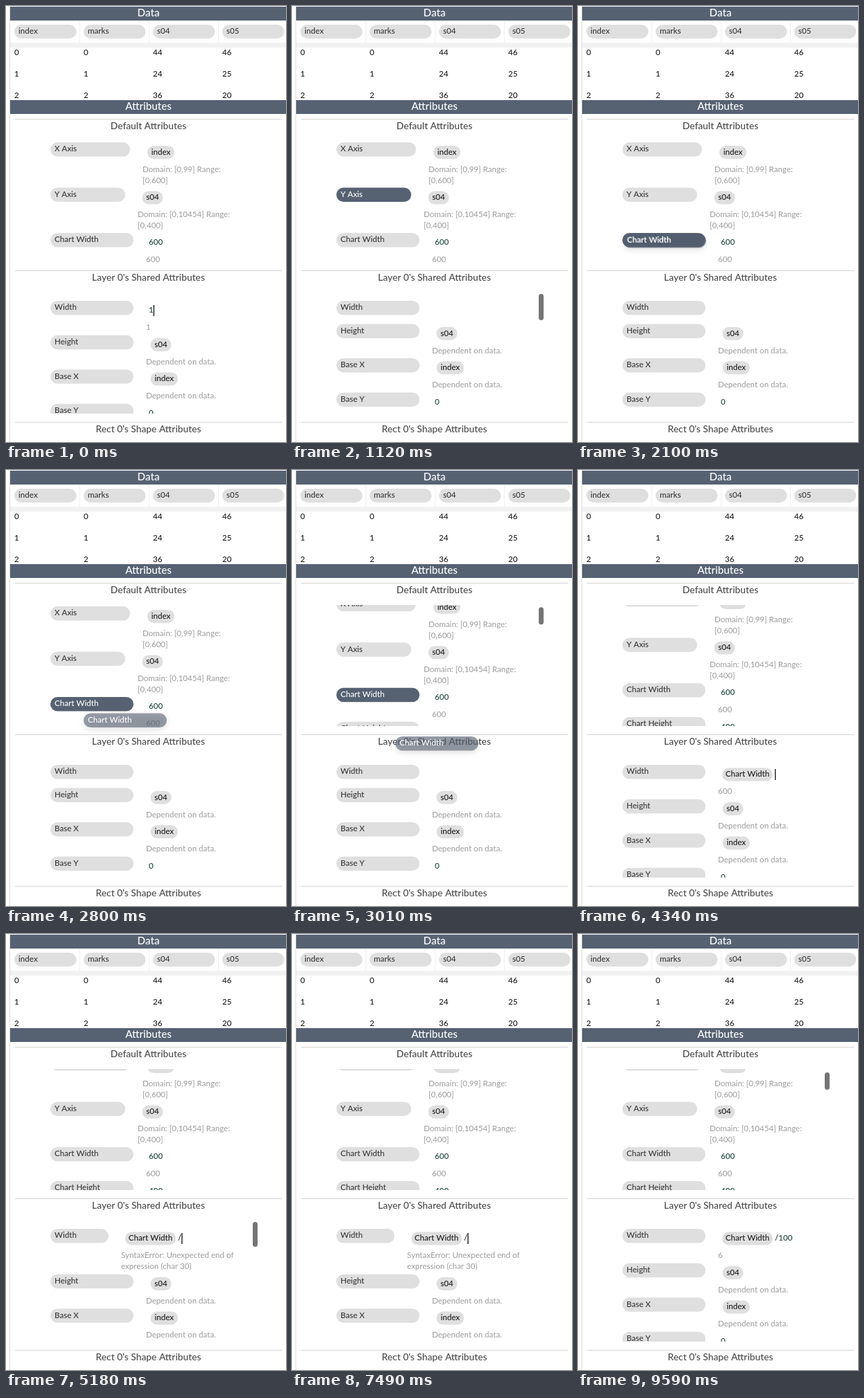
Write an HTML page with a canvas that moves like this. It is 404 by 630 pixels and loops after 9660 ms.

```html
<!DOCTYPE html>
<html lang="en">
<head>
<meta charset="utf-8">
<title>Attribute panel</title>
<style>
  html, body { margin: 0; width: 100%; height: 100%; overflow: hidden; background: #fff; }
  canvas { display: block; width: 404px; height: 630px; }
</style>
</head>
<body>
<canvas id="stage"></canvas>
<script>
const W = 404, H = 630, LOOP = 9660;
const SLATE = '#566272', PILL = '#dfdfdf', RULE = '#d4d4d4';
const INK = '#383838', DARK = '#1c1c1c', MUTED = '#9c9c9c', NUMBER = '#1d423b';
const SIZE = 11.6;

const canvas = document.getElementById('stage');
const ctx = canvas.getContext('2d');
const dpr = window.devicePixelRatio || 1;
canvas.width = W * dpr;
canvas.height = H * dpr;

const within = (t, a, b) => t >= a && t < b;
const anyOf = (t, spans) => spans.some(([a, b]) => within(t, a, b));

function track(t, keys) {
  if (t <= keys[0][0]) return keys[0].slice(1);
  for (let i = 1; i < keys.length; i++) {
    const a = keys[i - 1], b = keys[i];
    if (t <= b[0]) {
      const k = (t - a[0]) / (b[0] - a[0]);
      return a.slice(1).map((v, j) => v + (b[j + 1] - v) * k);
    }
  }
  return keys[keys.length - 1].slice(1);
}

function text(str, x, cy, color = DARK, size = SIZE, align = 'left') {
  const weight = color === MUTED ? 400 : 500;
  ctx.font = `${weight} ${size}px Lato, "Open Sans", sans-serif`;
  ctx.textAlign = align;
  ctx.fillStyle = color;
  ctx.fillText(str, x, cy + size * 0.29);
}

function rect(x, y, w, h, color) {
  ctx.fillStyle = color;
  ctx.fillRect(x, y, w, h);
}

function pill(x, y, w, h, color) {
  ctx.fillStyle = color;
  ctx.beginPath();
  ctx.roundRect(x, y, w, h, Math.min(w, h) / 2);
  ctx.fill();
}

function label(str, y, w = 120, active = false, x = 64) {
  pill(x, y, w, 20.5, active ? SLATE : PILL);
  text(str, x + 6, y + 10, active ? '#fff' : INK);
}

function token(str, x, y, w, active = false) {
  pill(x, y, w, 19, active ? SLATE : PILL);
  text(str, x + w / 2, y + 9.5, active ? '#fff' : DARK, SIZE, 'center');
}

const note = (str, x, cy) => text(str, x, cy, MUTED);
const caret = x => rect(x, 432, 1.3, 16, '#111');

function clip(y, h, draw) {
  ctx.save();
  ctx.beginPath();
  ctx.rect(0, y, W, h);
  ctx.clip();
  draw();
  ctx.restore();
}

function thumb(y, h, alpha) {
  if (alpha <= 0) return;
  ctx.globalAlpha = alpha;
  pill(356, y, 7, h, '#757575');
  ctx.globalAlpha = 1;
}

function bar(str, y, h) {
  rect(6, y, W - 6, h, SLATE);
  text(str, 205.5, y + h / 2, '#fff', 15.2, 'center');
}

function section(str, y) {
  rect(13, y, 385, 1, RULE);
  text(str, 205.5, y + 10.5, '#4a4a4a', 13.8, 'center');
}

function table() {
  for (const x of [106, 206, 306]) rect(x, 22, 1, 38, '#efefef');
  rect(6, 53, W - 6, 7, '#f2f2f2');
  ['index', 'marks', 's04', 's05'].forEach((name, i) => {
    pill(12 + i * 100, 27, 89.5, 20, PILL);
    text(name, 18 + i * 100, 37, INK);
  });
  const rows = [[0, 0, 44, 46], [1, 1, 24, 25], [2, 2, 36, 20]];
  rows.forEach((row, r) => row.forEach((v, c) => text(String(v), 12 + c * 100, 67.5 + r * 31, DARK)));
}

const SCROLL = [[2870, 0], [3080, 20]];
const DRAG = [[2100, 65, 329], [2310, 71, 332], [2600, 71, 332], [2800, 112, 351.5],
  [3010, 149, 385], [3220, 175, 418], [3430, 185, 433], [3570, 187, 434]];

function defaults(t) {
  const [scroll] = track(t, SCROLL);
  clip(195, 175, () => {
    ctx.translate(0, -scroll);
    label('X Axis', 197, 115, within(t, 1050, 1120));
    token('index', 204, 202, 39);
    note('Domain: [0,99] Range:', 197, 236.5);
    note('[0,600]', 197, 252.5);
    label('Y Axis', 262.5, 108, within(t, 1120, 1260));
    token('s04', 196.5, 267.5, 30);
    note('Domain: [0,10454] Range:', 190, 301.5);
    note('[0,400]', 190, 317.5);
    label('Chart Width', 328, 120, within(t, 1540, 4340));
    text('600', 206, 342, NUMBER);
    note('600', 202, 367);
    label('Chart Height', 377);
    text('400', 206, 391.5, NUMBER);
  });
  const [alpha] = track(t, [[2800, 0], [2870, 1], [3360, 1], [3430, .68], [3500, .35], [3570, 0]]);
  thumb(t >= 9590 ? 200 : 195 + scroll / 4, 25, t >= 9590 ? 1 : alpha);
}

// Expression held by the Width field, with the result below it.
function field(t) {
  if (t < 70) return { x: 206, tail: '1', result: ['1'], shift: 0 };
  if (t < 3780) return { x: 206, tail: '', result: [], shift: -16.2 };
  const expr = { x: 208, chip: true, tail: '', result: ['600'], shift: 0 };
  if (t < 4970) return expr;
  if (t < 7770) {
    return { x: 172, chip: true, tail: '/', shift: 16, narrow: true,
      result: ['SyntaxError: Unexpected end of', 'expression (char 30)'] };
  }
  const zeros = t < 8260 ? 0 : t < 8540 ? 1 : 2;
  return { ...expr, tail: '/1' + '0'.repeat(zeros), result: [String(600 / 10 ** zeros)] };
}

const CARET = [[0, 840], [1330, 1820], [3290, 4480], [4970, 5670], [6300, 6930], [7490, 9100]];

function shared(t) {
  const f = field(t);
  clip(416, 173, () => {
    label('Width', 426, f.narrow ? 84 : 120);
    let x = f.x;
    if (f.chip) {
      token('Chart Width', x, 430.5, 73, t < 4340);
      x += 76;
    }
    for (const part of f.tail.match(/\/|\d+/g) || []) {
      text(part, x, 440, part === '/' ? DARK : NUMBER);
      x += ctx.measureText(part).width;
    }
    if (anyOf(t, CARET)) caret(x);
    const noteX = f.narrow ? 166 : 202;
    f.result.forEach((line, i) => note(line, noteX, 465 + i * 15.5));

    ctx.translate(0, f.shift);
    label('Height', 475.7);
    token('s04', 208.5, 480, 30);
    note('Dependent on data.', 202, 514.5);
    label('Base X', 525.2);
    token('index', 208.5, 529.5, 39.5);
    note('Dependent on data.', 202, 564);
    label('Base Y', 574.7);
    text('0', 206, 588.5, NUMBER);
  });
  const fades = [[70, 1260, 1400], [3780, 4200, 4340], [4970, 5670, 5880], [7770, 8260, 8400]];
  for (const [on, hold, off] of fades) {
    if (within(t, on, off)) thumb(416, f.narrow ? 36 : 38, Math.min(1, (off - t) / (off - hold)));
  }
}

function ghost(t) {
  if (!within(t, 2100, 3780)) return;
  const [x, y] = track(t, DRAG);
  ctx.save();
  ctx.globalAlpha = 0.6;
  ctx.shadowColor = 'rgba(0,0,0,.2)';
  ctx.shadowBlur = 10 * dpr;
  ctx.shadowOffsetY = 3 * dpr;
  pill(x, y, 120, 20.5, SLATE);
  ctx.restore();
  text('Chart Width', x + 6, y + 10, '#fff');
}

function draw(t) {
  ctx.setTransform(dpr, 0, 0, dpr, 0, 0);
  rect(0, 0, W, H, '#fff');
  rect(5, 0, 1, H, '#dcdcdc');
  table();
  bar('Data', 1, 20);
  rect(6, 135, W - 6, H - 135, '#fff');
  bar('Attributes', 136, 20);
  section('Default Attributes', 163);
  section("Layer 0's Shared Attributes", 382);
  section("Rect 0's Shape Attributes", 601);
  defaults(t);
  shared(t);
  ghost(t);
}

const start = performance.now();
function tick() {
  const t = (performance.now() - start) % LOOP;
  draw(Math.floor(t / 70) * 70);
  requestAnimationFrame(tick);
}
tick();
</script>
</body>
</html>
```
